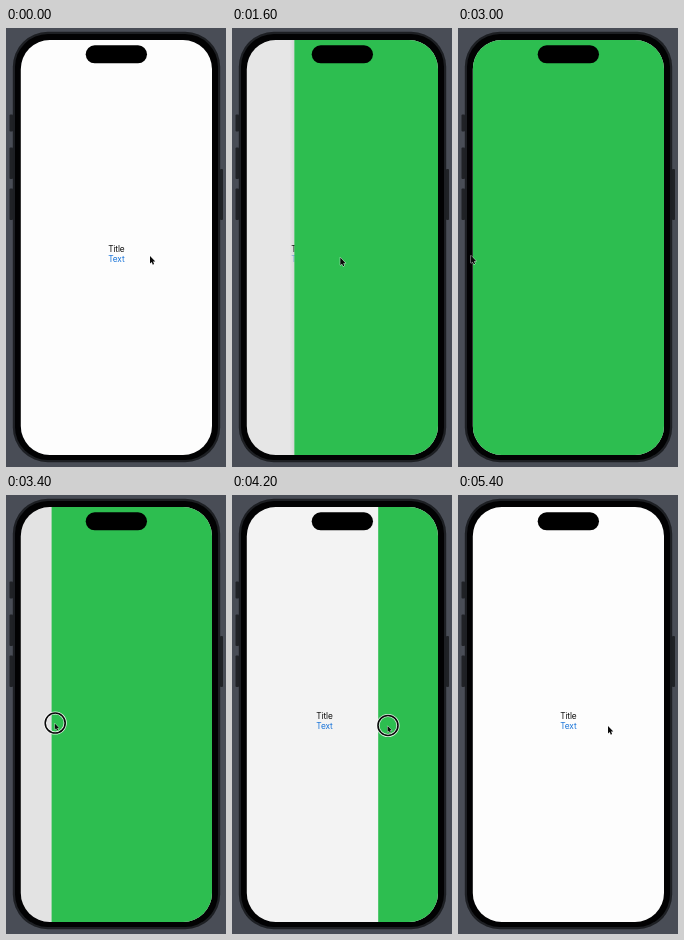
Recreate the animation shown at these times as an HTML page. Size 220 by 439 pixels, loop 5500 ms.

```html
<!DOCTYPE html>
<html lang="en">
<head>
<meta charset="utf-8">
<title>Swipe back</title>
<style>
  html, body { margin: 0; width: 100%; height: 100%; overflow: hidden; background: #494d56; }
  svg { display: block; width: 220px; height: 439px; }
  text { font: 8.3px Inter, Roboto, sans-serif; letter-spacing: -0.015em; text-anchor: middle; }
</style>
</head>
<body>
<svg viewBox="0 0 220 439">
  <defs>
    <clipPath id="screen"><rect x="14.8" y="12" width="191.2" height="415" rx="29"/></clipPath>
    <linearGradient id="shade">
      <stop offset="0" stop-color="#000" stop-opacity="0"/>
      <stop offset="1" stop-color="#000" stop-opacity=".07"/>
    </linearGradient>
  </defs>

  <rect width="220" height="439" fill="#494d56"/>
  <g fill="#202226">
    <rect x="3.5" y="86.5" width="3.5" height="17" rx="1"/>
    <rect x="3.5" y="119.5" width="3.5" height="31.5" rx="1"/>
    <rect x="3.5" y="160.5" width="3.5" height="31.5" rx="1"/>
    <rect x="214" y="141" width="3" height="51" rx="1"/>
  </g>
  <rect x="6.8" y="3.8" width="207.4" height="430.4" rx="35" fill="#1d1f23"/>
  <rect x="9" y="6" width="203" height="426" rx="33" fill="#020203"/>

  <g clip-path="url(#screen)">
    <rect x="14" y="11" width="193" height="417" fill="#fdfdfd"/>
    <rect id="dim" x="14" y="11" width="193" height="417"/>
    <g id="home">
      <text x="110.4" y="223.8" fill="#0c0c0c">Title</text>
      <text id="link" x="110.4" y="233.8" fill="#1672d8">Text</text>
    </g>
    <g id="page">
      <rect id="shadow" x="-5" y="11" width="5" height="417" fill="url(#shade)"/>
      <rect y="11" width="194" height="417" fill="#2dbe50"/>
    </g>
  </g>
  <rect x="79.7" y="17.3" width="61.3" height="18" rx="9"/>

  <g id="ring" fill="none">
    <circle r="10" stroke="#fff" stroke-width="3.2" stroke-opacity=".85"/>
    <circle r="10" stroke="#0a0a0a" stroke-width="1.6"/>
  </g>
  <path id="cursor" d="M0 0V7.6L1.7 6.1L2.8 8.7L4.1 8.1L3 5.6H5.3Z"
        fill="#0a0a0a" stroke="#fff" stroke-width=".8" paint-order="stroke"/>
</svg>
<script>
const LOOP = 5500, TICK = 100;
const LEFT = 14.8, WIDTH = 191.2;
const TAP = 1300, PUSH = 1450, GRAB = 3200, RELEASE = 4250;
const HOME = { x: 144, y: 228 };
const el = id => document.getElementById(id);

// pointer strokes, each slowing down towards its end point
const strokes = [
  { from: 0, to: 600, x: 108.3, y: 229.6, slow: 1.4 },
  { from: 1800, to: 3000, x: 13, y: 227.6, slow: 2.2 },
  { from: GRAB, to: 4300, x: 161, y: 231, slow: 1.38 },
  { from: 5000, to: 5400, x: 150, y: 231, slow: 1 }
];

const clamp = v => Math.min(1, Math.max(0, v));

function pointer(t) {
  return strokes.reduce((p, s) => {
    const k = 1 - (1 - clamp((t - s.from) / (s.to - s.from))) ** s.slow;
    return { x: p.x + (s.x - p.x) * k, y: p.y + (s.y - p.y) * k };
  }, HOME);
}

// critically damped spring, 0 to 1
const spring = s => s <= 0 ? 0 : 1 - (1 + 18 * s) * Math.exp(-18 * s);

// the drag starts after a short dead zone and trails the pointer
const dragged = t => 1 - Math.max(0, pointer(t).x - 16.1) * .942 / WIDTH;

// share of the screen covered by the green page
function cover(t) {
  if (t < GRAB) return spring((t - PUSH) / 1000);
  if (t < RELEASE) return dragged(t);
  return dragged(RELEASE) * Math.exp((RELEASE - t) / 60);
}

const move = (id, x, y) => el(id).setAttribute("transform", `translate(${x} ${y})`);
const fade = (id, value) => el(id).setAttribute("opacity", value);

function draw(t) {
  const p = cover(t), { x, y } = pointer(t);
  const tapped = t >= TAP && t < PUSH;
  const dragging = t >= GRAB && t < RELEASE;
  move("home", -.3 * WIDTH * p, 0);
  move("page", LEFT + WIDTH * (1 - p), 0);
  fade("page", p > .01 ? 1 : 0);
  fade("shadow", t < GRAB ? 1 : 0);
  fade("dim", .12 * p);
  fade("link", t < TAP ? 1 : .25 + .75 * clamp((t - PUSH) / 450));
  move("ring", x + .4, y - .4);
  fade("ring", tapped || dragging ? 1 : 0);
  move("cursor", x, y);
  if (dragging) el("cursor").transform.baseVal.appendItem(shrink());
}

// the pointer shrinks a little while dragging
function shrink() {
  const scale = document.querySelector("svg").createSVGTransform();
  scale.setScale(.8, .8);
  return scale;
}

const start = performance.now();
function frame() {
  const t = (performance.now() - start) % LOOP;
  draw(Math.floor(t / TICK) * TICK);
  requestAnimationFrame(frame);
}
frame();
</script>
</body>
</html>
```
